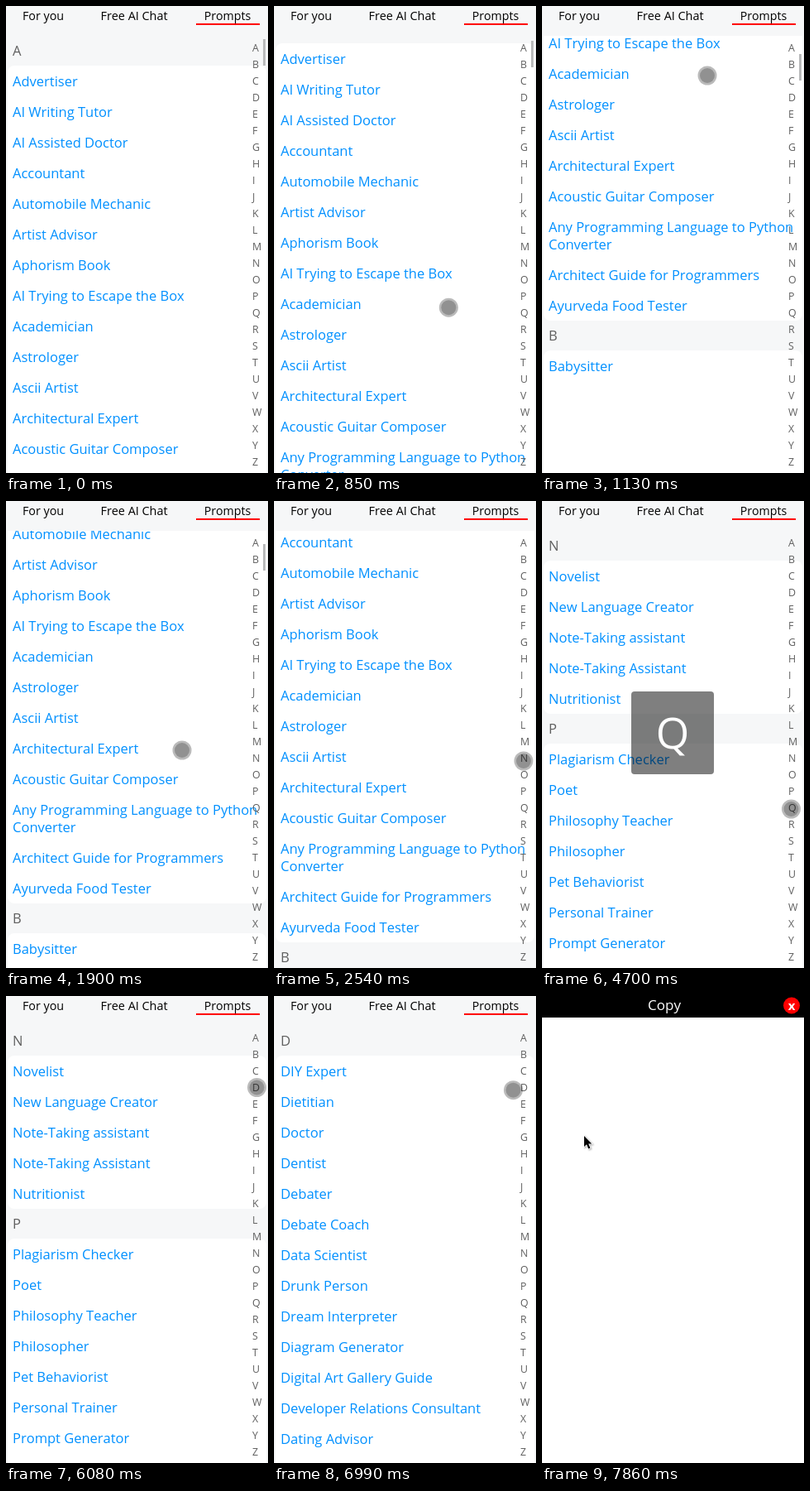
Recreate the animation shown at these times as an HTML page with a canvas. Size 317 by 564 pixels, loop 8000 ms.

```html
<!DOCTYPE html>
<html lang="en">
<head>
<meta charset="utf-8">
<title>Prompt list</title>
<style>
  html, body { margin: 0; width: 100%; height: 100%; overflow: hidden; background: #f6f7f8; }
  canvas { display: block; }
</style>
</head>
<body>
<canvas width="317" height="564"></canvas>
<script>
const ctx = document.querySelector('canvas').getContext('2d');
const LOOP = 8000, STEP = 70;

const sections = {
  top: [
    ['A', 'Advertiser', 'AI Writing Tutor', 'AI Assisted Doctor', 'Accountant', 'Automobile Mechanic',
      'Artist Advisor', 'Aphorism Book', 'AI Trying to Escape the Box', 'Academician', 'Astrologer',
      'Ascii Artist', 'Architectural Expert', 'Acoustic Guitar Composer',
      'Any Programming Language to Python\nConverter', 'Architect Guide for Programmers', 'Ayurveda Food Tester'],
    ['B', 'Babysitter', '', '', '', '', '', '', '']
  ],
  N: [
    ['N', 'Novelist', 'New Language Creator', 'Note-Taking assistant', 'Note-Taking Assistant', 'Nutritionist'],
    ['P', 'Plagiarism Checker', 'Poet', 'Philosophy Teacher', 'Philosopher', 'Pet Behaviorist',
      'Personal Trainer', 'Prompt Generator', '']
  ],
  D: [
    ['D', 'DIY Expert', 'Dietitian', 'Doctor', 'Dentist', 'Debater', 'Debate Coach', 'Data Scientist',
      'Drunk Person', 'Dream Interpreter', 'Diagram Generator', 'Digital Art Gallery Guide',
      'Developer Relations Consultant', 'Dating Advisor', '']
  ]
};

const smooth = u => u * u * (3 - 2 * u);
const speedUp = u => u ** 1.5;
const slowDown = u => 1 - (1 - u) ** 2.5;

// Keys: [time, values..., easing towards this key]
const pointer = [
  [60, 279, 551, smooth], [550, 214, 431, slowDown],
  [710, 214, 431, smooth], [1130, 200, 84, speedUp],
  [1550, 200, 84, smooth], [1900, 213, 301, smooth],
  [2110, 220, 330, smooth], [2390, 305, 315, smooth], [2540, 302, 314, smooth], [2680, 302, 313, smooth],
  [3530, 302, 313, smooth], [4090, 301.5, 372, smooth],
  [5310, 301.5, 372, smooth], [5730, 305, 235, smooth], [6080, 303.5, 110.5, slowDown],
  [6920, 303.5, 110.5, smooth], [7410, 50.5, 167.5, smooth]
];
const scrolling = [
  [780, 0, smooth], [1130, 305, speedUp], [1550, 416, slowDown],
  [1620, 416, smooth], [1900, 199, smooth], [2390, 152, slowDown]
];

// The picture advances in even steps, counted anew at the start of each gesture.
const gestures = [-10, 710, 2400, 3460, 5310, 6920];
function stepped(t) {
  const start = gestures.filter(g => g <= t).pop();
  return start + Math.floor((t - start) / STEP) * STEP;
}

function valueAt(keys, t) {
  const next = keys.findIndex(k => k[0] > t);
  if (next === 0) return keys[0].slice(1, -1);
  if (next < 0) return keys[keys.length - 1].slice(1, -1);
  const a = keys[next - 1], b = keys[next];
  const u = b[b.length - 1]((t - a[0]) / (b[0] - a[0]));
  return a.slice(1, -1).map((v, i) => v + (b[i + 1] - v) * u);
}

function text(str, x, baseline, size, color, align = 'left', weight = 400) {
  ctx.font = `${weight} ${size}px "Open Sans", "Noto Sans", sans-serif`;
  ctx.fontKerning = 'none';
  ctx.fillStyle = color;
  ctx.textAlign = align;
  ctx.fillText(str, x, baseline);
}

function box(x, y, w, h, r, color) {
  ctx.fillStyle = color;
  ctx.beginPath();
  ctx.roundRect(x, y, w, h, r);
  ctx.fill();
}

function disc(x, y, r, color) {
  ctx.fillStyle = color;
  ctx.beginPath();
  ctx.arc(x, y, r, 0, 7);
  ctx.fill();
}

function drawList(list, scroll) {
  ctx.save();
  ctx.beginPath();
  ctx.rect(0, 36, 317, 528);
  ctx.clip();
  let y = 36 - Math.round(scroll);
  for (const [letter, ...items] of list) {
    text(letter, 8, y + 24, 16.5, '#606060');
    y += 36;
    const rows = items.map(item => item.split('\n'));
    const height = rows.reduce((sum, lines) => sum + 16 + 21 * lines.length, 0);
    box(2, y, 313, height, 8, '#fff');
    for (const lines of rows) {
      lines.forEach((line, i) => text(line, 8, y + 25 + 21 * i, 16.5, '#0090ff'));
      y += 16 + 21 * lines.length;
    }
  }
  ctx.restore();
}

function drawTabs() {
  text('For you', 45, 17, 14.3, '#000', 'center');
  text('Free AI Chat', 155, 17, 14.4, '#000', 'center');
  text('Prompts', 268, 17, 14.2, '#000', 'center');
  box(230, 21, 77, 2, 0, '#f00');
}

function drawIndex() {
  for (let i = 0; i < 26; i++) {
    text(String.fromCharCode(65 + i), 298, 55 + 20 * i, 12.4, '#606060');
  }
}

function drawToast(letter) {
  box(108, 230, 100, 100, 4, 'rgba(0,0,0,.5)');
  text(letter, 158, 299, 52, '#fff', 'center');
}

function drawTouch(x, y) {
  disc(x, y, 11.5, 'rgba(0,0,0,.27)');
  disc(x, y, 9, 'rgba(0,0,0,.22)');
}

function drawArrow(x, y) {
  ctx.save();
  ctx.translate(x, y);
  ctx.shadowColor = 'rgba(0,0,0,.35)';
  ctx.shadowBlur = 2;
  ctx.shadowOffsetX = ctx.shadowOffsetY = 1;
  const shape = new Path2D('M0 0V13L3 10.2L5.2 15.5L7.4 14.6L5.2 9.4H9.3Z');
  ctx.strokeStyle = '#fff';
  ctx.lineWidth = 1.5;
  ctx.stroke(shape);
  ctx.shadowColor = 'transparent';
  ctx.fillStyle = '#000';
  ctx.fill(shape);
  ctx.restore();
}

function drawCopyPage() {
  box(0, 0, 317, 564, 0, '#fff');
  box(0, 0, 317, 26, 0, '#000');
  text('Copy', 148, 17, 17, '#fff', 'center');
  disc(302, 11.5, 10, '#f00');
  text('x', 302, 16.5, 15, '#fff', 'center', 700);
}

function draw(now) {
  const t = now % LOOP, s = stepped(t);
  const between = (a, b) => t >= a && t < b;

  if (t >= 7790) {
    drawCopyPage();
  } else {
    box(0, 0, 317, 564, 0, '#f6f7f8');
    const page = t < 3000 ? 'top' : t < 6460 ? 'N' : 'D';
    const scroll = page === 'top' ? valueAt(scrolling, s)[0] : 0;
    drawList(sections[page], scroll);
    drawTabs();
    drawIndex();
    if (t < 2540) {
      box(311, 40 + Math.round(scroll * 0.0606), 3, 32, 0, t < 2470 ? '#b9babb' : '#dcdddf');
    }
    if (between(3000, 3060)) drawToast('N');
    if (between(4700, 4840)) drawToast('Q');
    if (between(6460, 6540)) drawToast('D');
  }

  if (t >= 7860) drawArrow(51, 169);
  else if (t >= 60) drawTouch(...valueAt(pointer, s));
  requestAnimationFrame(draw);
}
requestAnimationFrame(draw);
</script>
</body>
</html>
```
